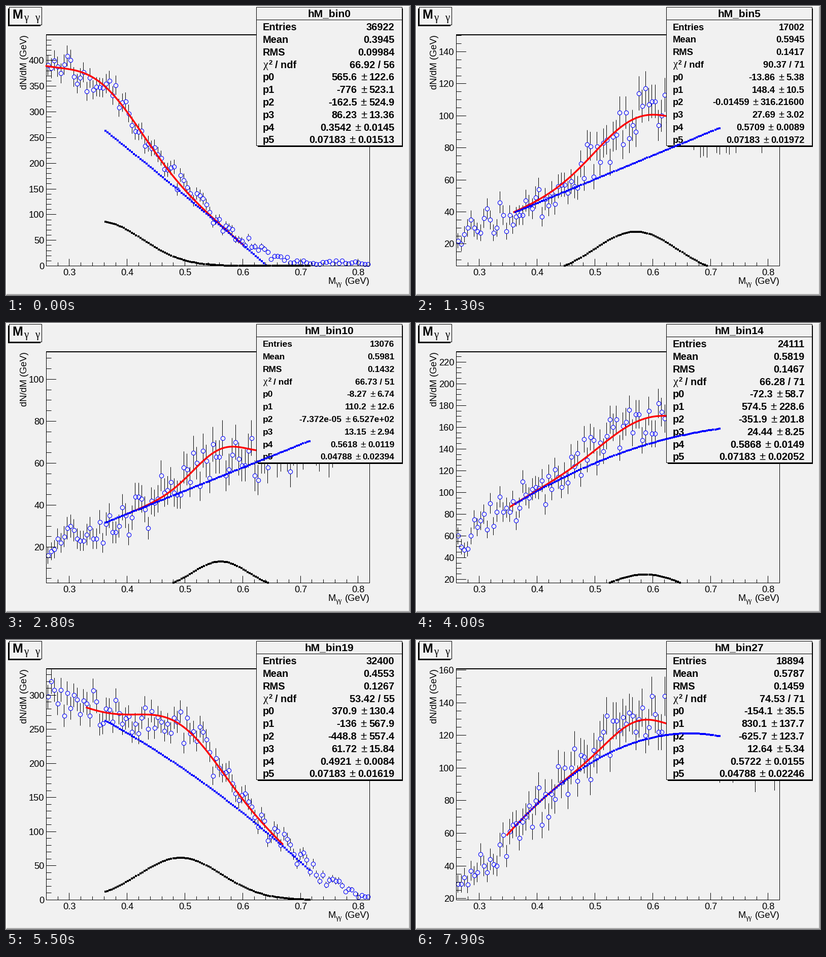
These frames come from a looping animation (796 px wide and 572 px high, 8000 ms). A matplotlib script:

```python
import numpy as np
import matplotlib.pyplot as plt
from matplotlib.animation import FuncAnimation
from matplotlib.collections import LineCollection
from matplotlib.patches import Rectangle

W, H, DPI = 796, 572, 100
PX = 72 / DPI                       # one pixel in points
LEFT, RIGHT, TOP, BOTTOM = 79.5, 716.5, 57.5, 514.5
X_MIN, X_MAX, N_POINTS = 0.26, 0.82, 100
BG, BLUE = "#f1f1f1", "#0000ff"
SERIF = "Liberation Serif"
plt.rcParams["font.family"] = "Liberation Sans"
plt.rcParams["path.snap"] = False

# Key fits; the bins between them are blended.
# stat: entries, mean, rms, chi2, ndf; view: count axis; fit: drawn mass range
FITS = {
    0: dict(stat=[36922, .3945, .09984, 66.92, 56], view=[0, 449.6], fit=[.26, .60],
            p=[565.6, -776, -162.5, 86.23, .3542, .07183],
            err=[122.6, 523.1, 524.9, 13.36, .0145, .01513]),
    5: dict(stat=[17002, .5945, .1417, 90.37, 71], view=[6.28, 150.4], fit=[.36, .70],
            p=[-13.86, 148.4, -.01459, 27.69, .5709, .07183],
            err=[5.38, 10.5, 316.216, 3.02, .0089, .01972]),
    10: dict(stat=[13076, .5981, .1432, 66.73, 51], view=[2.9, 113], fit=[.40, .70],
             p=[-8.27, 110.2, -7.372e-05, 13.15, .5618, .04788],
             err=[6.74, 12.6, 652.7, 2.94, .0119, .02394]),
    14: dict(stat=[24111, .5819, .1467, 66.28, 71], view=[16.7, 229.3], fit=[.354, .70],
             p=[-72.3, 574.5, -351.9, 24.44, .5868, .07183],
             err=[58.7, 228.6, 201.8, 8.25, .0149, .02052]),
    19: dict(stat=[32400, .4553, .1267, 53.42, 55], view=[0, 338.5], fit=[.33, .669],
             p=[370.9, -136, -448.8, 61.72, .4921, .07183],
             err=[130.4, 567.9, 557.4, 15.84, .0084, .01619]),
    23: dict(stat=[19322, .5906, .1426, 72.68, 71], view=[8.75, 160.1], fit=[.365, .70],
             p=[-78.7, 437.5, -262.2, 24.77, .5862, .07183],
             err=[1.1, 1.2, 5.4, 3.10, .0090, .01701]),
    27: dict(stat=[18894, .5787, .1459, 74.53, 71], view=[19.1, 160.7], fit=[.348, .70],
             p=[-154.1, 830.1, -625.7, 12.64, .5722, .04788],
             err=[35.5, 137.7, 123.7, 5.34, .0155, .02246]),
}


def blend(field, b):
    rows = np.array([fit[field] for fit in FITS.values()], float)
    return np.array([np.interp(b, list(FITS), column) for column in rows.T])


def to_x(mass):
    return LEFT + (mass - X_MIN) / (X_MAX - X_MIN) * (RIGHT - LEFT)


def background(p, m):
    return p[0] + p[1] * m + p[2] * m**2


def peak(p, m):
    return p[3] * np.exp(-0.5 * ((m - p[4]) / p[5])**2)


def spectrum(b, p, low):
    """Counts scattered around the fit, which fades softly to a thin tail."""
    mass = X_MIN + (np.arange(N_POINTS) + 0.5) * (X_MAX - X_MIN) / N_POINTS
    curve = background(p, mass) + peak(p, mass)
    top = curve.max()
    soft = 0.09 * top
    mean = np.maximum(soft * np.logaddexp(0, curve / soft), 0.015 * top)
    noise = np.clip(np.random.default_rng(b).normal(size=N_POINTS), -1.7, 1.7)
    counts = np.round(mean + noise * np.sqrt(mean))
    return mass, np.maximum(counts, max(1.5 * low, 0.01 * top))


def tick_step(span):
    rough = span / 10
    power = 10 ** np.floor(np.log10(rough))
    for lead, parts in ((1, 5), (2.5, 4), (5, 5), (10, 5)):
        if rough / power <= lead:
            return int(lead) * power, parts


def value_and_error(value, error):
    text = f"{value:.4g}"
    if "e" in text:
        return text, f"{error:.3e}"
    if "." in text:
        return text, f"{error:.{len(text.split('.')[1])}f}"
    return text, f"{error:.4g}"


fig = plt.figure(figsize=(W / 100, H / 100), dpi=DPI, facecolor=BG)
ax = fig.add_axes([0, 0, 1, 1])
ax.set(xlim=(0, W), ylim=(H, 0))
ax.axis("off")
moving = []


def label(x, y, text, size, **kw):
    kw = {"va": "baseline", "zorder": 5, **kw}
    return ax.text(x, y, text, fontsize=size * PX, **kw)


def bold(x, y, text, size, **kw):
    return label(x, y, text, size, weight="bold", **kw)


def box(x0, y0, x1, y1, color, zorder=4, edge="none"):
    ax.add_patch(Rectangle((x0, y0), x1 - x0, y1 - y0, facecolor=color,
                           edgecolor=edge, lw=PX, zorder=zorder))


def lines(segments, zorder=2, width=1):
    return ax.add_collection(LineCollection(
        segments, colors="black", linewidths=width * PX, zorder=zorder))


def extent(text):
    return text.get_window_extent(fig.canvas.get_renderer())


def draw_fixed():
    box(0, 0, W, 2, "white", 0)
    box(0, 0, 2, H, "white", 0)
    box(W - 2, 1, W, H, "#a9a9a9", 0)
    box(1, H - 2, W, H, "#a9a9a9", 0)

    # title with its shadow to the lower left
    box(4, 5, 68, 40, "black")
    box(6.5, 2.5, 70.5, 37.5, BG, edge="black")
    bold(12, 25, "M", 25)
    for x in (40, 62):
        label(x, 29, "γ", 21, family=SERIF, ha="center")

    # statistics box with its shadow to the lower right
    box(496, 5, 782, 279, "black")
    box(493.5, 2.5, 780.5, 276.5, BG, edge="black")
    lines([[(493, 27.5), (781, 27.5)]], 4.5)

    # frame and mass axis
    lines([[(LEFT, TOP), (LEFT, BOTTOM)], [(LEFT, BOTTOM), (RIGHT, BOTTOM)],
           [(RIGHT, TOP), (RIGHT, BOTTOM)]])
    lines([[(79, 57), (717, 57)]], width=2)
    ticks = []
    for i in range(13, 42):
        x = np.floor(to_x(i * 0.02)) + 0.5
        major = i % 5 == 0
        ticks.append([(x, BOTTOM), (x, BOTTOM - (14 if major else 7))])
        if major:
            label(x, 533, f"{i * 0.02:.1f}", 18.3, ha="center")
    lines(ticks)
    label(634, 550, "M", 18.3)
    label(649.5, 554, "γγ", 14, family=SERIF)
    label(717, 550, "(GeV)", 18.3, ha="right")
    label(41, 57, "dN/dM (GeV)", 18.3, rotation=90, ha="right",
          rotation_mode="anchor")


def stats_size(pairs):
    """The widest row sets the text size of the whole box."""
    probe = bold(0, 0, "\n".join(" ± ".join(pair) for pair in pairs), 20)
    width = extent(probe).width
    probe.remove()
    return 6400 / (width + 154)


def draw_stats(b, p):
    entries, mean, rms, chi2, ndf = blend("stat", b)
    pairs = [value_and_error(*pair) for pair in zip(p, blend("err", b))]
    size = stats_size(pairs)
    base = [41 + 24.8 * row + 0.358 * size for row in range(10)]

    def put(x, y, text, scale=1, draw_text=bold, **kw):
        moving.append(draw_text(x, y, text, size * scale, **kw))
        return moving[-1]

    moving.append(bold(636.5, 21, f"hM_bin{b}", 21, ha="center"))
    put(507, base[3] - 1, "χ", 1.1, label, family=SERIF)
    put(507 + 0.53 * size, base[3] - 0.35 * size, "2", 0.65)
    put(507 + 1.15 * size, base[3], "/ ndf")
    single = {0: ("Entries", f"{entries:.0f}"), 1: ("Mean", f"{mean:.4g}"),
              2: ("RMS", f"{rms:.4g}"), 3: ("", f"{chi2:.4g} / {ndf:.0f}")}
    for row, (name, text) in single.items():
        put(506, base[row], name)
        put(765.5, base[row], text, ha="right")
    for i, (value, error) in enumerate(pairs):
        y = base[4 + i]
        put(506, y, f"p{i}")
        x = extent(put(765.5, y, error, ha="right")).x0
        put(x - 0.53 * size, y, "±", 1.1, label, ha="center")
        put(x - 1.2 * size, y, value, ha="right")


def draw(frame):
    b = (frame + 2) // 3
    while moving:
        moving.pop().remove()

    p = blend("p", b)
    low, high = blend("view", b)
    mass, counts = spectrum(b, p, low)

    def to_y(v):
        return BOTTOM - (v - low) / (high - low) * (BOTTOM - TOP)

    # count axis
    step, parts = tick_step(high - low)
    minor = step / parts
    ticks = []
    for i in range(int(np.ceil(low / minor)), int(high / minor) + 1):
        y = np.floor(to_y(i * minor)) + 0.5
        major = i % parts == 0
        ticks.append([(LEFT, y), (LEFT + (19.5 if major else 10), y)])
        if major:
            moving.append(label(75.5, y + 6.5, f"{i * minor:.0f}", 18.3, ha="right"))
    moving.append(lines(ticks))

    # points, with error bars that start at the rim of the circle
    xs, ys = to_x(mass), to_y(counts)
    bars = []
    for x, y, end in zip(np.floor(xs) + 0.5, ys, to_y(counts - np.sqrt(counts))):
        reach = end - y
        if reach > 4:
            bars += [[(x, y - reach), (x, y - 4)],
                     [(x, y + 4), (x, min(y + reach, BOTTOM))]]
    moving.append(lines(bars, 1))
    moving.extend(ax.plot(xs, ys, "o", ms=8.3 * PX, mfc="none", mec=BLUE,
                          mew=1.1 * PX, zorder=1.5))

    # fit, and its two components
    m = np.linspace(*blend("fit", b), 120)
    moving.extend(ax.plot(to_x(m), to_y(background(p, m) + peak(p, m)),
                          color="red", lw=3.4 * PX, zorder=3))
    m = np.linspace(0.362, 0.7155, 100)
    for part, color in ((background, BLUE), (peak, "black")):
        y = to_y(part(p, m))
        inside = (y >= TOP) & (y <= BOTTOM + 0.5)
        moving.extend(ax.plot(to_x(m)[inside], y[inside], "s", ms=3.4 * PX,
                              color=color, mew=0, zorder=6))

    draw_stats(b, p)
    return moving


draw_fixed()
anim = FuncAnimation(fig, draw, frames=80, interval=100, repeat=True,
                     repeat_delay=0, blit=False)
plt.show()
```
